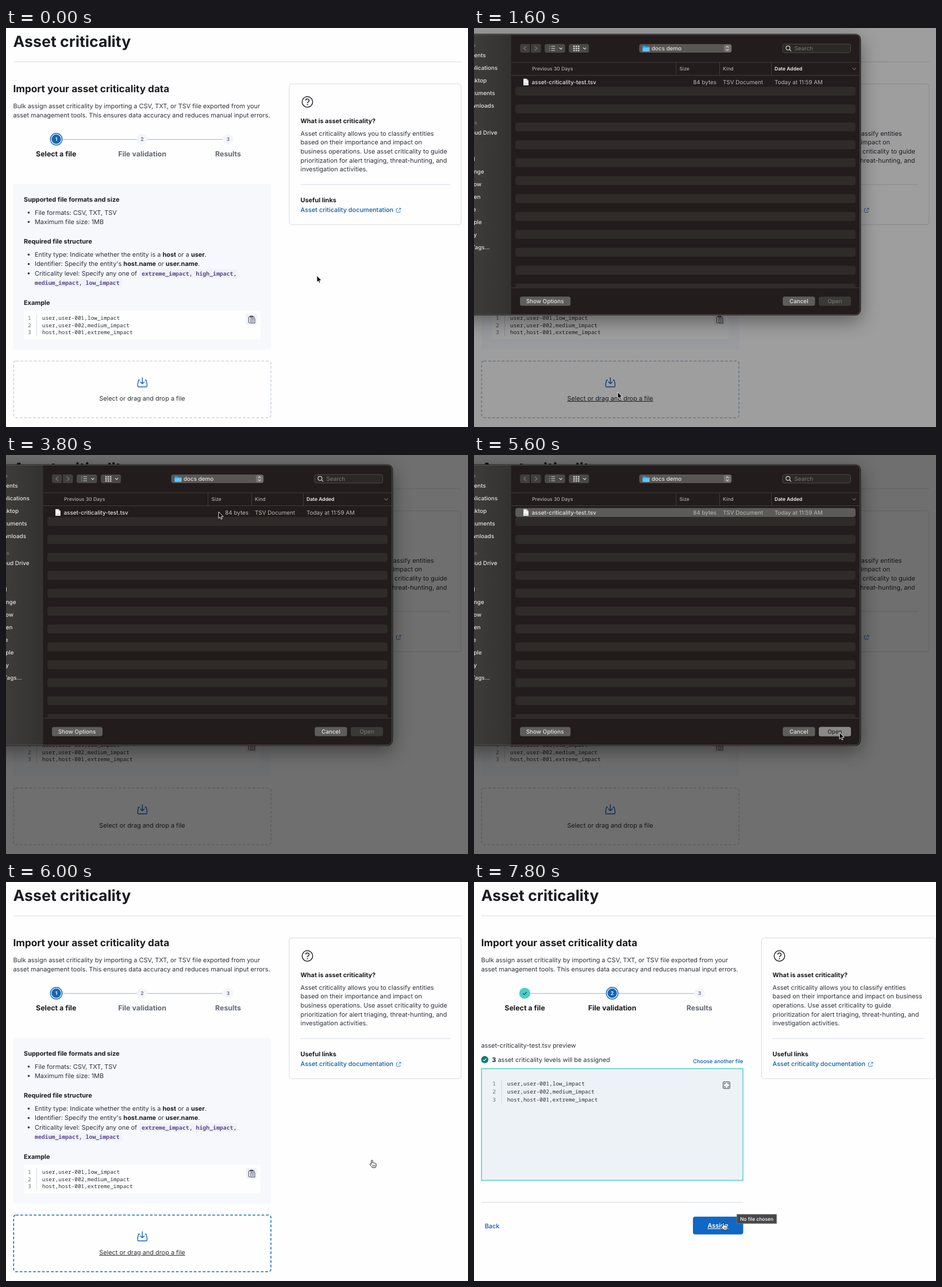
These frames come from a looping animation (804 px wide and 696 px high, 8 s). An HTML page:

```html
<!DOCTYPE html>
<html lang="en">
<head>
<meta charset="utf-8">
<title>Asset criticality import</title>
<style>
html, body { margin: 0; width: 100%; height: 100%; overflow: hidden; background: #fefefe; }
svg { display: block; width: 804px; height: 696px; }
text {
  font: 400 10.9px Inter, "Open Sans", sans-serif; font-optical-sizing: none;
  text-rendering: geometricPrecision; fill: #2e313a; white-space: pre;
}
.h1 { font-size: 26.7px; }
.h2 { font-size: 17.15px; }
.h1, .h2, .b { font-weight: 700; fill: #1a1c21; }
.step { font-size: 12.4px; font-weight: 700; fill: #1a1c21; }
.mid { text-anchor: middle; }
.end { text-anchor: end; }
.grey { fill: #646a77; }
.link { font-weight: 500; fill: #0b5cad; }
.small { font-size: 9.33px; }
.num { font-size: 8.6px; font-weight: 600; }
.white { fill: #fff; }
.btn { font-weight: 600; }
.hint { font-size: 8.45px; font-weight: 500; }
.mono, .tag { font: 400 9.4px "Roboto Mono", "Noto Sans Mono", "DejaVu Sans Mono", monospace; }
.tag { font-size: 9.85px; font-weight: 700; fill: #5f478f; }
.rule { stroke: #d3dae6; fill: none; }
.track { stroke: #b4cae2; stroke-width: 1.4; }
.ico { fill: none; stroke: #343741; }
.ink { stroke: #1a1c21; stroke-width: 1.4; }
.blue { stroke: #1565b5; stroke-width: 1.4; }

.sheet text { font-size: 9.85px; fill: #e4e3e2; }
.sheet .col { font-size: 8.55px; font-weight: 500; fill: #b0aeac; }
.sheet .sort { fill: #f0efee; font-weight: 600; }
.sheet .m { font-weight: 500; }
.sheet .dim { fill: #b9b7b5; }
.sheet .sec { font-size: 8.4px; font-weight: 600; fill: #777573; }
.sheet .off { fill: #7c7a77; }
.sheet .dark { fill: #2c2a28; }
.glyph { fill: none; stroke: #d6d4d2; stroke-width: 1.2; }
.line { stroke: #413e3b; }

/* 2.5% is one 200 ms step */
.a { animation: 8s step-end -10ms infinite; }
.one { animation-name: one; }
.two { animation-name: two; }
.zone { animation-name: zone; }
.label { animation-name: label; }
.veil { animation-name: veil; }
.drop { animation-name: drop; }
.picked { animation-name: picked; }
.pressed { animation-name: pressed; }
.move { animation-name: move; }
.hand { animation-name: hand; }
.arrow { animation-name: arrow; }
.tip { animation-name: tip; }
.assign { animation-name: assign; }
@keyframes one { 0% { opacity: 1 } 80%, 100% { opacity: 0 } }
@keyframes two { 0% { opacity: 0 } 80%, 100% { opacity: 1 } }
@keyframes zone {
  0% { stroke: #ccd4e0 } 12.5% { stroke: #a3bcd8 } 27.5% { stroke: #ccd4e0 } 75%, 100% { stroke: #1c68b2 }
}
@keyframes label {
  0% { text-decoration: none } 12.5% { text-decoration: underline }
  27.5% { text-decoration: none } 75%, 100% { text-decoration: underline }
}
@keyframes veil { 0% { opacity: 0 } 20% { opacity: .38 } 22.5% { opacity: .56 } 72.5% { opacity: .38 } 75%, 100% { opacity: 0 } }
@keyframes drop {
  0% { opacity: 0; transform: translateY(-6px) }
  20% { opacity: 1; transform: translateY(-6px) }
  22.5% { opacity: 1; transform: none }
  72.5% { opacity: 1; transform: translateY(-6px) }
  75%, 100% { opacity: 0; transform: none }
}
@keyframes picked { 0% { opacity: 0 } 52.5%, 100% { opacity: 1 } }
@keyframes pressed { 0% { opacity: 0 } 70%, 100% { opacity: 1 } }
@keyframes hand {
  0% { opacity: 0 } 12.5% { opacity: 1 } 20% { opacity: 0 }
  75% { opacity: 1 } 80% { opacity: 0 } 90%, 100% { opacity: 1 }
}
@keyframes arrow {
  0% { opacity: 1 } 12.5% { opacity: 0 } 20% { opacity: 1 }
  75% { opacity: 0 } 80% { opacity: 1 } 90%, 100% { opacity: 0 }
}
@keyframes tip { 0% { opacity: 0 } 92.5%, 100% { opacity: 1 } }
@keyframes assign { 0% { text-decoration: none } 90%, 100% { text-decoration: underline } }
@keyframes move {
  0% { transform: translate(541px, 432px) }
  5% { transform: translate(510px, 452px) }
  7.5% { transform: translate(440px, 500px) }
  10% { transform: translate(350px, 560px) }
  12.5% { transform: translate(285px, 605px) }
  15% { transform: translate(255px, 628px) }
  17.5% { transform: translate(250px, 635px) }
  32.5% { transform: translate(251px, 600px) }
  35% { transform: translate(262px, 500px) }
  37.5% { transform: translate(290px, 370px) }
  40% { transform: translate(325px, 235px) }
  42.5% { transform: translate(355px, 140px) }
  45% { transform: translate(368px, 106px) }
  47.5% { transform: translate(370px, 99px) }
  57.5% { transform: translate(400px, 150px) }
  60% { transform: translate(470px, 260px) }
  62.5% { transform: translate(555px, 390px) }
  65% { transform: translate(612px, 462px) }
  67.5% { transform: translate(632px, 480px) }
  70% { transform: translate(636px, 484px) }
  75% { transform: translate(637px, 485px) }
  80% { transform: translate(625px, 492px) }
  82.5% { transform: translate(585px, 518px) }
  85% { transform: translate(520px, 556px) }
  87.5% { transform: translate(468px, 582px) }
  90% { transform: translate(442px, 592px) }
  92.5%, 100% { transform: translate(434px, 594px) }
}
</style>
</head>
<body>
<svg viewBox="0 0 804 696">
<defs>
  <pattern id="rows" x="72" y="108.2" width="592" height="31.25" patternUnits="userSpaceOnUse">
    <rect width="592" height="15.6" rx="4" fill="#2e2b28"/>
  </pattern>
  <linearGradient id="side" x2="1" y2="0">
    <stop offset="0" stop-color="#3d3c3b"/><stop offset="1" stop-color="#343231"/>
  </linearGradient>
  <filter id="shadow" x="-20%" y="-20%" width="140%" height="140%">
    <feDropShadow dx="0" dy="10" stdDeviation="16" flood-opacity=".4"/>
  </filter>
  <g id="on"><circle r="10.2" fill="#fff" stroke="#1565b5" stroke-width="1.4"/><circle r="8.2" fill="#1565b5"/></g>
  <circle id="off" r="9.2" fill="#f3f5f9"/>
  <path id="out" fill="none" stroke="#2a6fb5" stroke-width=".9" d="M3.2 1H1.4A1 1 0 0 0 .4 2V6.6a1 1 0 0 0 1 1H6a1 1 0 0 0 1-1V5M5 .4H7.9V3.3M7.7.6L3.4 4.8"/>
  <g id="card">
    <circle class="ico ink" cx="524.5" cy="129" r="9.2"/>
    <path class="ico ink" d="M521.6 126.6a2.9 2.9 0 1 1 4.3 2.5q-1.4.8-1.4 2.2"/>
    <circle cx="524.5" cy="133.8" r="1" fill="#1a1c21"/>
    <text class="b" x="512.5" y="165.8">What is asset criticality?</text>
    <text class="b" x="512.5" y="304">Useful links</text>
    <text class="link" x="512.5" y="321.4">Asset criticality documentation</text>
    <use href="#out" x="679" y="314"/>
  </g>
</defs>

<rect width="804" height="696" fill="#fefefe"/>
<text class="h1" x="12.5" y="33.4">Asset criticality</text>
<path class="rule" d="M13 59H792"/>
<text class="h2" x="12.5" y="112.4">Import your asset criticality data</text>
<text x="12.5" y="140">Bulk assign asset criticality by importing a CSV, TXT, or TSV file exported from your</text>
<text x="12.5" y="155.8">asset management tools. This ensures data accuracy and reduces manual input errors.</text>

<g class="a one">
  <path class="track" d="M98 194.5H228M246 194.5H377"/>
  <use href="#on" x="87.5" y="194"/><use href="#off" x="237" y="194"/><use href="#off" x="386.5" y="194"/>
  <text class="num mid white" x="87.5" y="197.2">1</text>
  <text class="num mid grey" x="237" y="197.2">2</text>
  <text class="num mid grey" x="386.5" y="197.2">3</text>
  <text class="step mid" x="87.2" y="223.6">Select a file</text>
  <text class="step mid grey" x="237" y="223.6">File validation</text>
  <text class="step mid grey" x="386.5" y="223.6">Results</text>

  <rect x="12.5" y="272" width="449" height="289" rx="4" fill="#f6f8fc"/>
  <text class="b" x="31" y="302.8">Supported file formats and size</text>
  <text x="50" y="325.6">File formats: CSV, TXT, TSV</text>
  <text x="50" y="342">Maximum file size: 1MB</text>
  <text class="b" x="31" y="376.2">Required file structure</text>
  <text x="50" y="399">Entity type: Indicate whether the entity is a <tspan class="b">host</tspan> or a <tspan class="b">user</tspan>.</text>
  <text x="50" y="415.4">Identifier: Specify the entity's <tspan class="b">host.name</tspan> or <tspan class="b">user.name</tspan>.</text>
  <text x="50" y="431.8">Criticality level: Specify any one of</text>
  <g fill="#343741">
    <circle cx="39.5" cy="322" r="1.8"/><circle cx="39.5" cy="338.3" r="1.8"/>
    <circle cx="39.5" cy="395.3" r="1.8"/><circle cx="39.5" cy="411.7" r="1.8"/><circle cx="39.5" cy="428.1" r="1.8"/>
  </g>
  <path fill="#eff2f8" d="M232 421H402V436H232ZM50 437.5H202V452H50Z"/>
  <text class="tag" x="236" y="431.6">extreme_impact, high_impact,</text>
  <text class="tag" x="50" y="448">medium_impact, low_impact</text>
  <text class="b" x="31" y="482.8">Example</text>
  <rect x="31" y="493" width="412" height="50" fill="#fefefe"/>
  <path class="rule" d="M53.5 499V537"/>
  <text class="mono grey" x="38" y="509">1</text><text class="mono" x="63" y="509">user,user-001,low_impact</text>
  <text class="mono grey" x="38" y="521.6">2</text><text class="mono" x="63" y="521.6">user,user-002,medium_impact</text>
  <text class="mono grey" x="38" y="534.2">3</text><text class="mono" x="63" y="534.2">host,host-001,extreme_impact</text>
  <rect x="417.5" y="499" width="19" height="19" rx="3" fill="#eef1f7"/>
  <path class="ico" stroke-width=".9" d="M425 514.4H423.3a1 1 0 0 1-1-1V504.6a1 1 0 0 1 1-1H431a1 1 0 0 1 1 1V506M424.8 503.4V502.4H429.6V504.8H424.8ZM426 507H433V514.8H426ZM427.8 509.6H431.2M427.8 512.2H431.2"/>

  <rect class="a zone" x="13.3" y="581" width="447.7" height="98.8" rx="4" fill="none" stroke-width="1.55" stroke-dasharray="4.66 3.11"/>
  <path class="ico blue" d="M233 614.2H230.7L229.2 621V624.4a1.6 1.6 0 0 0 1.6 1.6H243.8a1.6 1.6 0 0 0 1.6-1.6V621L243.9 614.2H241.6M237.3 609.6V620.4M233.6 617L237.3 620.6L241 617"/>
  <text class="mid a label" x="237" y="649.8">Select or drag and drop a file</text>

  <rect class="rule" x="493" y="97.5" width="299" height="245.5" rx="4"/>
  <use href="#card"/>
  <path class="rule" d="M512.5 273H773"/>
  <text x="512.5" y="187.8">Asset criticality allows you to classify entities</text>
  <text x="512.5" y="203.4">based on their importance and impact on</text>
  <text x="512.5" y="219.1">business operations. Use asset criticality to guide</text>
  <text x="512.5" y="234.8">prioritization for alert triaging, threat-hunting, and</text>
  <text x="512.5" y="250.4">investigation activities.</text>
</g>

<g class="a two">
  <path class="rule" d="M792 59H804"/>
  <path class="track" d="M98 194.5H230M251 194.5H383"/>
  <circle cx="88.3" cy="194" r="9.6" fill="#48cfc6"/>
  <path class="ico" stroke-width="1.1" d="M85 194.2L87.4 196.6L91.7 191.8"/>
  <use href="#on" x="240.5" y="194"/><use href="#off" x="392.5" y="194"/>
  <text class="num mid white" x="240.5" y="197.2">2</text>
  <text class="num mid grey" x="392.5" y="197.2">3</text>
  <text class="step mid" x="88.5" y="223.6">Select a file</text>
  <text class="step mid" x="240.5" y="223.6">File validation</text>
  <text class="step mid grey" x="392.3" y="223.6">Results</text>

  <text x="12.5" y="288.6">asset-criticality-test.tsv preview</text>
  <circle cx="18.7" cy="309.8" r="6.2" fill="#097a70"/>
  <path fill="none" stroke="#fff" stroke-width="1.1" d="M15.8 310L17.9 312L21.6 307.8"/>
  <text x="31.3" y="313.8"><tspan class="b">3</tspan> asset criticality levels will be assigned</text>
  <text class="link small end" x="468.5" y="316">Choose another file</text>
  <rect x="13" y="325.6" width="455" height="194.8" fill="#edf2f7" stroke="#3fc8c3" stroke-width="1.3"/>
  <path class="rule" d="M48 344V387.5"/>
  <text class="mono grey" x="32.3" y="355">1</text><text class="mono" x="57.8" y="355">user,user-001,low_impact</text>
  <text class="mono grey" x="32.3" y="369">2</text><text class="mono" x="57.8" y="369">user,user-002,medium_impact</text>
  <text class="mono grey" x="32.3" y="383">3</text><text class="mono" x="57.8" y="383">host,host-001,extreme_impact</text>
  <rect class="ico" x="433.6" y="348.6" width="11.6" height="11.6" rx="1.2"/>
  <path class="ico" d="M436 353V351H438M441 351H443V353M443 356V358H441M438 358H436V356"/>
  <path class="rule" d="M13 558.8H468.5"/>
  <text class="link" x="18.7" y="603.8">Back</text>
  <rect x="381" y="583.8" width="87.5" height="31" rx="4" fill="#0f68c3"/>
  <text class="mid white btn a assign" x="424.5" y="603.2">Assign</text>

  <rect class="rule" x="500.3" y="97.5" width="303.2" height="245.5" rx="4"/>
  <use href="#card" x="7"/>
  <path class="rule" d="M519.5 273H785"/>
  <text x="519.5" y="187.8">Asset criticality allows you to classify entities</text>
  <text x="519.5" y="203.4">based on their importance and impact on business</text>
  <text x="519.5" y="219.1">operations. Use asset criticality to guide</text>
  <text x="519.5" y="234.8">prioritization for alert triaging, threat-hunting, and</text>
  <text x="519.5" y="250.4">investigation activities.</text>

  <g class="a tip">
    <rect x="457.4" y="579.8" width="69.2" height="16" fill="#48484a" stroke="#77777a" stroke-width=".8"/>
    <text class="mid white hint" x="492" y="590.8">No file chosen</text>
  </g>
</g>

<rect class="a veil" width="804" height="696"/>

<g class="a drop sheet">
  <rect x="-120" y="17" width="792.5" height="489.5" rx="9" fill="#211e1b" stroke="#0c0b0a" stroke-width="1.6" filter="url(#shadow)"/>
  <path fill="url(#side)" d="M0 17.8H64.5V505.8H0Z"/>
  <rect x="-120" y="17.4" width="791.8" height="488.6" rx="8.6" fill="none" stroke="#6a6866" stroke-width=".9"/>
  <g class="end">
    <text class="sec" x="3" y="39">Favorites</text>
    <text class="m" x="20.5" y="57.4">Recents</text>
    <text class="m" x="41" y="79.2">Applications</text>
    <text class="m" x="22" y="101">Desktop</text>
    <text class="m" x="36.5" y="122.8">Documents</text>
    <text class="m" x="35" y="144.6">Downloads</text>
    <text class="sec" x="5.5" y="173.6">Locations</text>
    <text class="m" x="40.5" y="191.6">Cloud Drive</text>
    <text class="m" x="1.5" y="238.4">Red</text>
    <text class="m" x="17.5" y="260.4">Orange</text>
    <text class="m" x="13" y="282.4">Yellow</text>
    <text class="m" x="11.5" y="304.2">Green</text>
    <text class="m" x="3.5" y="326.2">Blue</text>
    <text class="m" x="13.5" y="348">Purple</text>
    <text class="m" x="5" y="370">Gray</text>
    <text class="m" x="27.5" y="391.8">All Tags...</text>
  </g>

  <path fill="#413f3c" d="M83 34H97V49H83a3 3 0 0 1-3-3V37a3 3 0 0 1 3-3ZM99 34H113.5a3 3 0 0 1 3 3V46a3 3 0 0 1-3 3H99Z"/>
  <path fill="none" stroke="#7b7977" stroke-width="1.2" d="M90.5 38L86.8 41.5L90.5 45M106 38L109.7 41.5L106 45"/>
  <g fill="#4b4946">
    <rect x="123" y="34" width="35.5" height="15" rx="3.5"/><rect x="165" y="34" width="35" height="15" rx="3.5"/>
  </g>
  <path class="glyph" d="M131 38H132.3M131 41.5H132.3M131 45H132.3M134.5 38H141M134.5 41.5H141M134.5 45H141M148.5 40.3L151 42.8L153.5 40.3M190 40.3L192.5 42.8L195 40.3"/>
  <path fill="none" stroke="#d6d4d2" stroke-width="2.4" stroke-dasharray="2.6 1.4" d="M172.8 38H183.4M172.8 41.8H183.4M172.8 45.4H183.4"/>
  <rect x="287.5" y="34" width="161" height="15" rx="4" fill="#595653"/>
  <path fill="#2a9fe0" d="M293.5 38a1 1 0 0 1 1-1H298L299.3 38.3H304.5a1 1 0 0 1 1 1V46a1 1 0 0 1-1 1H294.5a1 1 0 0 1-1-1Z"/>
  <path fill="#62c4f5" d="M293.5 40.2H305.5V46a1 1 0 0 1-1 1H294.5a1 1 0 0 1-1-1Z"/>
  <text class="m" x="309" y="45">docs demo</text>
  <rect x="434.8" y="35.3" width="12.4" height="12.4" rx="3" fill="#767370"/>
  <path class="glyph" d="M438.7 40.2L441 37.9L443.3 40.2M438.7 42.9L441 45.2L443.3 42.9"/>
  <rect x="537" y="34" width="118.5" height="15" rx="3.5" fill="#2b2825" stroke="#52504d" stroke-width=".9"/>
  <circle class="glyph" cx="546.4" cy="40.8" r="3.5"/><path class="glyph" d="M549 43.4L552 46.4"/>
  <text class="off" x="557.5" y="45">Search</text>

  <path class="line" d="M64.5 66H672M64.5 88.5H672M351.5 66.5V88M427.5 66.5V88M517.5 66.5V88M64.5 459H672"/>
  <text class="col" x="101" y="80">Previous 30 Days</text>
  <text class="col" x="357.5" y="80">Size</text>
  <text class="col" x="433" y="80">Kind</text>
  <text class="col sort" x="523" y="80">Date Added</text>
  <path fill="none" stroke="#a9a7a5" d="M658.5 75.8L661.5 78.8L664.5 75.8"/>
  <rect x="72" y="108.2" width="592" height="350.5" fill="url(#rows)"/>
  <rect class="a picked" x="72" y="92.5" width="592" height="15.6" rx="4" fill="#5d5b59"/>
  <path fill="#f4f4f4" d="M86 94.5H91.5L94.8 97.8V106H86Z"/>
  <path fill="#b9b9b9" d="M91.5 94.5V97.8H94.8ZM87.5 103H93V104H87.5Z"/>
  <text class="m" x="100.5" y="104">asset-criticality-test.tsv</text>
  <text class="dim end" x="422" y="104">84 bytes</text>
  <text class="dim" x="433" y="104">TSV Document</text>
  <text class="dim" x="523" y="104">Today at 11:59 AM</text>

  <g fill="#5f5d5a">
    <rect x="80" y="474.5" width="88" height="16" rx="3.5"/><rect x="537.3" y="474.5" width="56.2" height="16" rx="3.5"/>
  </g>
  <text class="mid m" x="123.5" y="485.8">Show Options</text>
  <text class="mid m" x="565.3" y="485.8">Cancel</text>
  <rect x="600" y="474.5" width="56" height="16" rx="3.5" fill="#3b3936"/>
  <text class="mid off" x="628" y="485.8">Open</text>
  <g class="a picked">
    <rect x="600" y="474.5" width="56" height="16" rx="3.5" fill="#73716f"/>
    <text class="mid m" x="628" y="485.8">Open</text>
  </g>
  <g class="a pressed">
    <rect x="600" y="474.5" width="56" height="16" rx="3.5" fill="#8b8987"/>
    <text class="mid m dark" x="628" y="485.8">Open</text>
  </g>
</g>

<g class="a move">
  <path class="a arrow" stroke="#fff" stroke-width=".9" d="M0 0V11.5L2.6 9.1L4.3 13L6.2 12.2L4.6 8.4H8.1Z"/>
  <g class="a hand" stroke="#000">
    <path fill="#fff" stroke-width=".9" stroke-linejoin="round" d="M-1.3 7.3V1.4a1.2 1.2 0 0 1 2.4 0V5.2c.6-.9 2-.7 2.2.2.7-.6 1.9-.3 2 .6.9-.4 1.9.1 1.9 1.1V9.6c0 1.7-1 2.2-1.2 3.5H.4C0 11.6-2.4 9.6-3.6 8c-.9-1.3.8-2.2 2.3-.7Z"/>
    <path stroke-width=".7" d="M1.4 8.3V11M3.2 8.3V11M5 8.3V11"/>
  </g>
</g>
</svg>
</body>
</html>
```
